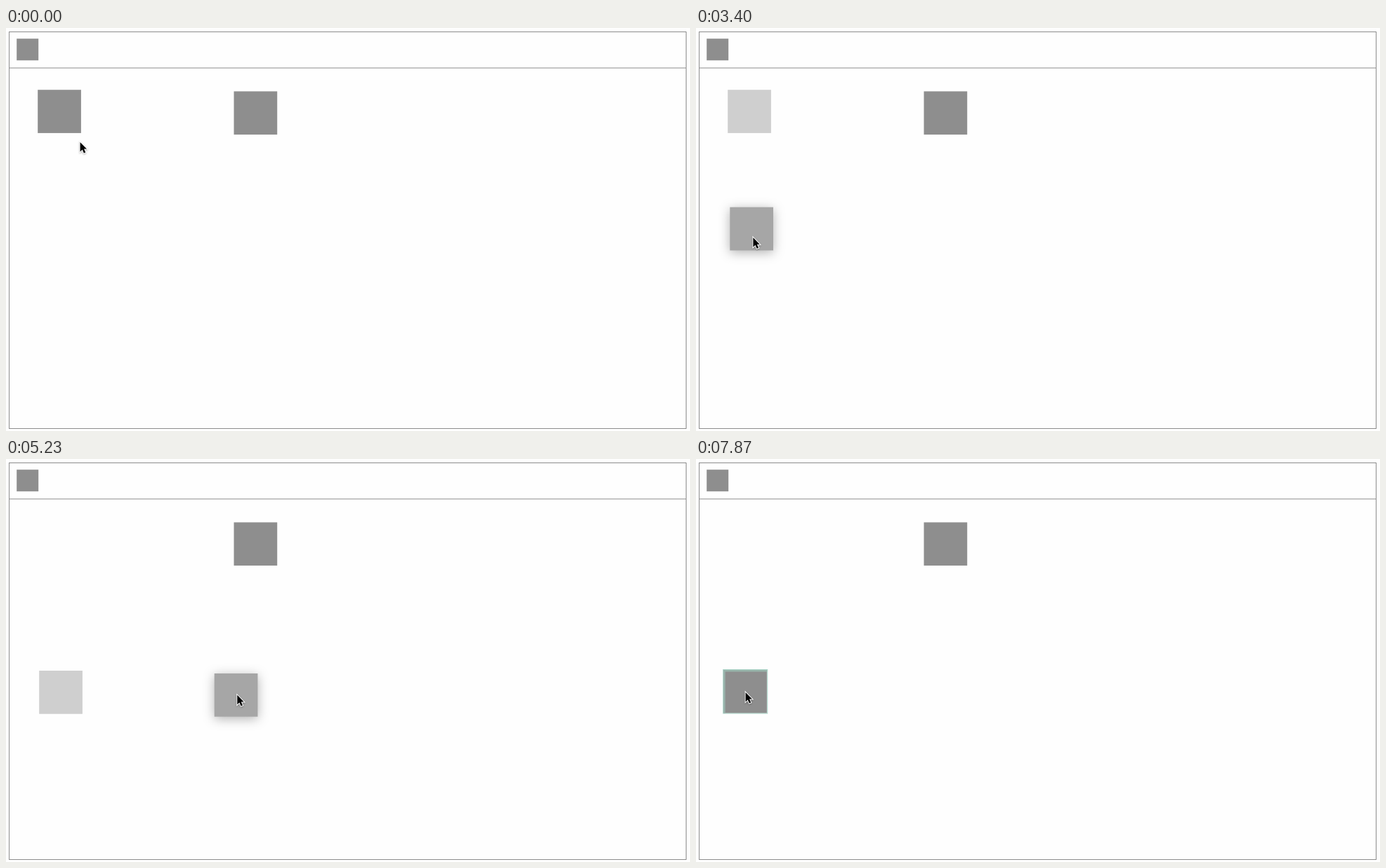
An HTML page that plays this animation: 974 px wide and 575 px high, repeating every 8000 ms.

```html
<!DOCTYPE html>
<html lang="en">
<head>
<meta charset="utf-8">
<title>Drag and drop</title>
<style>
  html, body { margin: 0; width: 100%; height: 100%; overflow: hidden; background: #fefefe; }
  svg { display: block; }
  .line { fill: none; stroke: #8c8c8c; }
  .box { width: 61.7px; height: 61.7px; fill: #8e8e8e; }
  #tool { width: 31px; height: 31px; }
  #preview { fill: #a6a6a6; filter: drop-shadow(0 3px 8px rgba(0,0,0,.3)); }
  #outline rect { fill: none; stroke: #a6d2c5; }
  #outline path { fill: #98b3aa; }
  .cursor { stroke: #fff; paint-order: stroke; filter: drop-shadow(0 1px 1px rgba(0,0,0,.3)); }
</style>
</head>
<body>
<svg width="974" height="575">
  <rect class="line" x="4.5" y="5.5" width="964" height="566"/>
  <path class="line" d="M4 57H969"/>
  <rect id="tool" class="box" x="15.2" y="15.2"/>
  <rect class="box" x="324.5" y="90.4"/>
  <rect id="item" class="box"/>
  <g id="outline">
    <rect x="-.5" y="-.5" width="63" height="62.5"/>
    <path d="M0 0H62V2.5H2.5V61.5H0Z"/>
  </g>
  <rect id="preview" class="box"/>
  <path id="arrow" class="cursor" stroke-width="2"
    d="M.6 1.9V15.4L3.7 12.5L5.9 17.5L8.3 16.5L6.1 11.6H10Z"/>
  <path id="move" class="cursor" stroke-width="2.4"
    d="M0-6.6L2.9-3.5H.9V-.9H3.5V-2.9L6.6 0L3.5 2.9V.9H.9V3.5H2.9L0 6.6L-2.9 3.5H-.9V.9H-3.5V2.9L-6.6 0L-3.5-2.9V-.9H-.9V-3.5H-2.9Z"/>
</svg>
<script>
const LOOP = 8000, SIZE = 62;
const HOME = [45.2, 88.2];
const POINTER = [105, 161];

// Pointer moves: start, end, goal x, goal y
const moves = [
  [30, 270, 74, 105],
  [1130, 1250, 68, 104],
  [1250, 1400, 78.5, 127.5],
  [2500, 3240, 81, 291.5],
  [3330, 3640, 79.5, 334],
  [4730, 5310, 342, 335],
  [5570, 5750, 370, 339],
  [5780, 5930, 363, 335],
  [6630, 7250, 89, 336],
  [7470, 7720, 70, 331]
];

// Grab offset, drop place and the time the outline disappears
const drags = [
  { start: 2500, end: 3800, grab: [32.5, 41.5], drop: [47.2, 302], deselect: 4400 },
  { start: 4730, end: 5870, grab: [32, 29], drop: [334, 306], deselect: 6430 },
  { start: 6630, end: 7800, grab: [28, 29.5], drop: [39.2, 301], deselect: LOOP }
];

const [item, outline, preview, arrow, move] =
  ['item', 'outline', 'preview', 'arrow', 'move'].map(id => document.getElementById(id));

const place = (node, [x, y]) => node.setAttribute('transform', `translate(${x} ${y})`);
const show = (node, on) => node.style.visibility = on ? 'visible' : 'hidden';
const smooth = k => k * k * (3 - 2 * k);

function pointerAt(t) {
  let [x, y] = POINTER;
  for (const [start, end, goalX, goalY] of moves) {
    const k = smooth(Math.min(1, Math.max(0, (t - start) / (end - start))));
    x += (goalX - x) * k;
    y += (goalY - y) * k;
  }
  return [x, y];
}

function draw(now) {
  const t = now % LOOP;
  const pointer = pointerAt(t);
  const active = drags.find(d => t >= d.start && t < d.end);
  const last = drags.filter(d => t >= d.end).pop();
  const spot = last ? last.drop : HOME;

  place(item, spot);
  item.style.fill = active ? '#cfcfcf' : '#8e8e8e';
  place(outline, spot);
  show(outline, last && t < last.deselect);

  show(preview, active);
  if (active) place(preview, pointer.map((v, i) => v - active.grab[i]));

  const hovering = !active && last !== drags[2] && pointer[1] < spot[1] + SIZE;
  show(move, hovering);
  show(arrow, !hovering);
  place(hovering ? move : arrow, pointer);
}

function tick() {
  draw(performance.now());
  requestAnimationFrame(tick);
}
tick();
</script>
</body>
</html>
```
